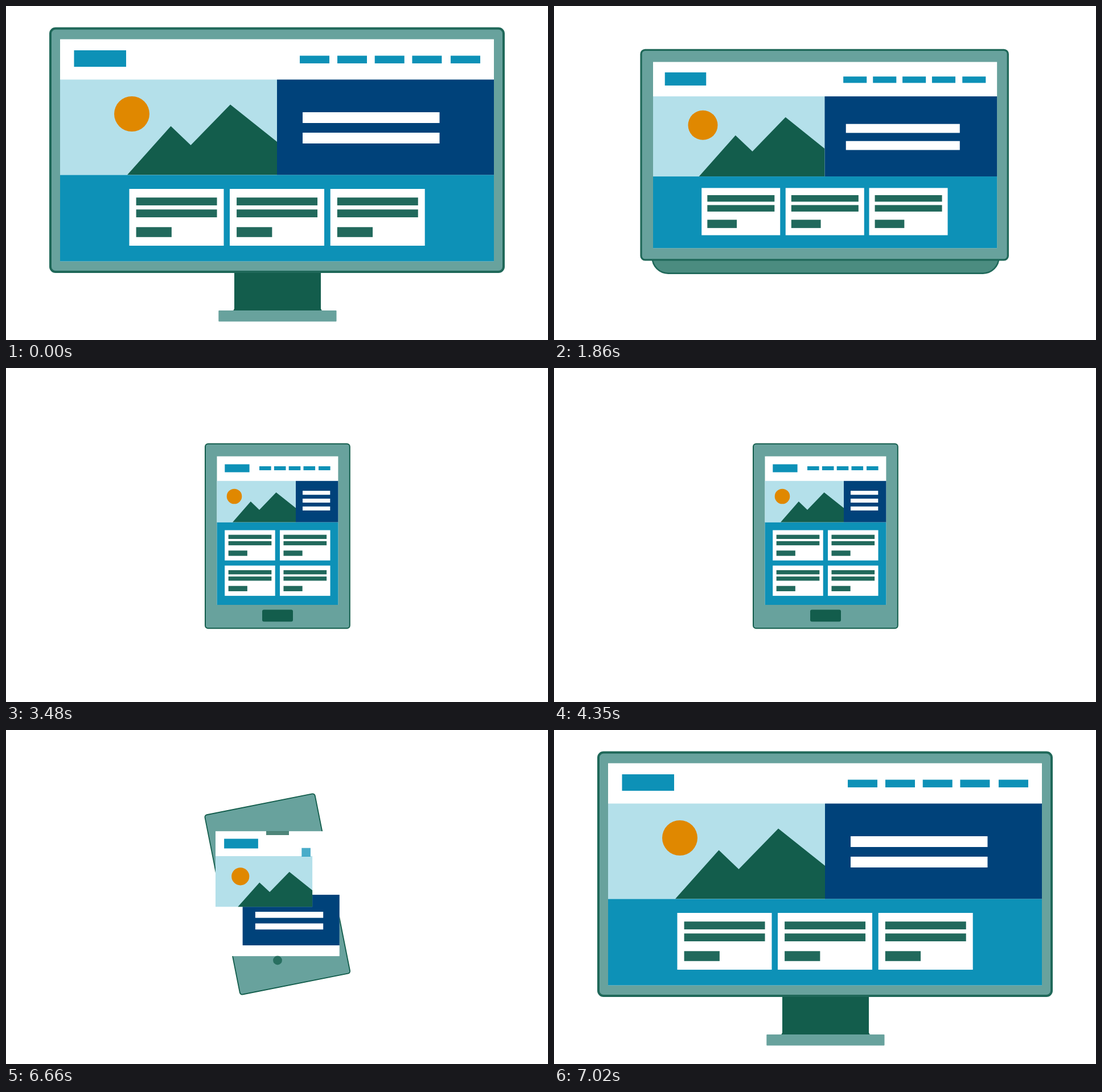
Animation, 952 px wide and 588 px high, one loop 7050 ms. Source, as an HTML page with a canvas:

```html
<!DOCTYPE html>
<html lang="en">
<head>
<meta charset="utf-8">
<title>Responsive layout</title>
<style>
  html, body { margin: 0; width: 100%; height: 100%; overflow: hidden; background: #fff; }
  canvas { display: block; }
</style>
</head>
<body>
<canvas id="stage" width="952" height="588"></canvas>
<script>
const ctx = document.getElementById('stage').getContext('2d');
const LOOP = 7050, STEP = 30;

const C = {
  page: '#fff', cyan: '#0d91b7', sky: '#b4e0ea', navy: '#00427a', sun: '#e08800',
  dark: '#135d4c', bar: '#21695c', body: '#68a29d', base: '#4b8c80', edge: '#1f6859'
};

// body: centre x, y, width, height, radius, stroke; boxes: left, top, right, bottom;
// peaks: foot x, then x, y of the ridge; lines: x, y, width, height, pitch;
// nav: x, y, span, width, height; cards: width, height, then x, y of each
const desktop = {
  body: [476, 253.8, 796, 428.5, 9, 4],
  screen: [95, 58.5, 857, 449.5],
  sky: [95, 129.5, 476, 297.3],
  navy: [476, 129.5, 857, 297.3],
  logo: [119.5, 78, 211, 107],
  sun: [221, 190, 31],
  peaks: [213, 289.5, 211.5, 324.5, 245, 394, 173.5, 476, 239],
  lines: [521, 187, 240.5, 19, 36],
  nav: [516, 87.5, 265, 52, 13.5],
  cards: [166, 100, 216.5, 322, 393, 322, 569.7, 322, 569.7, 322]
};
const laptop = {
  body: [474.3, 270.5, 492.5, 310.5, 5, 2.6],
  screen: [253, 138.5, 699.3, 403],
  sky: [253, 188.7, 474.5, 302.8],
  navy: [474.5, 188.7, 699.3, 302.8],
  logo: [270, 155.7, 323.5, 173],
  sun: [302, 229.5, 21],
  peaks: [296.5, 348, 244, 372.5, 267, 419.3, 218, 474.5, 263],
  lines: [504.5, 228.3, 159.5, 12.5, 24.2],
  nav: [500.3, 160.8, 153.2, 30.2, 9],
  cards: [110, 66.3, 302, 318.7, 420.5, 318.7, 537.3, 318.7, 537.3, 318.7]
};
const tablet = {
  body: [476.9, 295.8, 253.8, 324.8, 5, 2],
  screen: [370.5, 155.5, 583.4, 417],
  sky: [370.5, 198.8, 509, 271.5],
  navy: [509, 198.8, 583.4, 271.5],
  logo: [384.3, 169.5, 427.6, 183.5],
  sun: [401, 226, 13.3],
  peaks: [398, 429.8, 235, 445, 249.7, 474.5, 219, 509, 246.5],
  lines: [521, 216.2, 48.3, 7, 13.8],
  nav: [445, 173, 104, 20.6, 7],
  cards: [88.5, 53.3, 384.2, 285.5, 481, 285.5, 384.2, 347.8, 481, 347.8]
};
const phone = {
  body: [476.9, 294, 164, 254.8, 3.5, 1.5],
  screen: [407, 195.3, 547, 390.8],
  sky: [407, 235.3, 547, 313.2],
  navy: [407, 313, 547, 390.8],
  logo: [420.8, 207.7, 476, 223],
  sun: [439, 267.5, 13.4],
  peaks: [435, 467.5, 276.5, 483, 291, 512.5, 260.5, 547, 288.5],
  lines: [426, 339, 102, 9.5, 18.3],
  nav: tablet.nav,
  cards: tablet.cards
};

const MOVES = [
  { at: 1740, from: desktop, to: laptop, turn: 0 },
  { at: 3150, from: laptop, to: tablet, turn: 90 },
  { at: 4950, from: tablet, to: phone, turn: 0 },
  { at: 6630, from: phone, to: desktop, turn: -90 }
];
const MOVE_TIME = 240;

const ramp = (t, a, b) => Math.min(1, Math.max(0, (t - a) / (b - a)));
const during = (t, a, b, c, d) => ramp(t, a, b) - ramp(t, c, d);
const mix = (a, b, p) => a.map((v, i) => v + (b[i] - v) * p);

function pose(t) {
  const move = MOVES.filter(m => t >= m.at).pop() || MOVES[0];
  const p = ramp(t, move.at, move.at + MOVE_TIME);
  const s = {};
  for (const key in desktop) s[key] = mix(move.from[key], move.to[key], p);
  s.angle = 0;
  if (move.turn && p < 1) {
    const [x, y, w, h, ...rest] = move.to.body;
    s.body = mix(move.from.body, [x, y, h, w, ...rest], p);
    s.angle = move.turn * p * Math.PI / 180;
  }
  s.edge = move.from === tablet || move.from === phone && p < 1 ? C.dark : C.edge;
  if (move.to === tablet && p === 1) s.edge = C.dark;
  return s;
}

function fill(color, x, y, w, h) {
  ctx.fillStyle = color;
  ctx.fillRect(x, y, w, h);
}
function box(color, [l, t, r, b]) { fill(color, l, t, r - l, b - t); }
function rounded(color, x, y, w, h, r) {
  ctx.beginPath();
  ctx.roundRect(x, y, w, h, r);
  ctx.fillStyle = color;
  ctx.fill();
}
function disc(color, x, y, r) {
  ctx.beginPath();
  ctx.arc(x, y, r, 0, Math.PI * 2);
  ctx.fillStyle = color;
  ctx.fill();
}
function faded(alpha, paint) {
  if (alpha <= 0) return;
  ctx.save();
  ctx.globalAlpha = alpha;
  paint();
  ctx.restore();
}
function outline(color, width) {
  ctx.strokeStyle = color;
  ctx.lineWidth = width;
  ctx.stroke();
}

function drawStand(t) {
  const out = 1 - during(t, 1500, 1740, 6870, 7020);
  if (out <= 0) return;
  ctx.save();
  ctx.beginPath();
  ctx.rect(0, 460, 952, 128);
  ctx.clip();
  ctx.translate(0, -95 * (1 - out));
  ctx.fillStyle = C.dark;
  ctx.fill(new Path2D('M401 450V533l-2 3.5H555l-2-3.5V450z'));
  rounded(C.body, 373.3, 536, 207.2, 19.5, 1);
  ctx.restore();
}

function drawKeyboard(t) {
  faded(during(t, 1740, 1860, 3030, 3150), () => {
    rounded(C.base, 172.6, 426.6, 608.8, 44, [0, 0, 28, 28]);
    outline(C.edge, 2.6);
    rounded(C.dark, 409.3, 427.5, 135.2, 17, [0, 0, 8, 8]);
  });
}

function drawBody(s) {
  const [x, y, w, h, r, line] = s.body;
  ctx.save();
  ctx.translate(x, y);
  ctx.rotate(s.angle);
  rounded(C.body, -w / 2, -h / 2, w, h, r);
  outline(s.edge, line);
  ctx.restore();
}

function drawPicture(s) {
  const bottom = s.sky[3], p = s.peaks;
  box(C.sky, s.sky);
  disc(C.sun, ...s.sun);
  ctx.beginPath();
  ctx.moveTo(p[0], bottom);
  for (let i = 1; i < 9; i += 2) ctx.lineTo(p[i], p[i + 1]);
  ctx.lineTo(p[7], bottom);
  ctx.fillStyle = C.dark;
  ctx.fill();
}

function drawCard(x, y, w, h) {
  fill(C.page, x, y, w, h);
  const bar = (top, wide, high) => fill(C.bar, x + w * .073, y + h * top, w * wide, h * high);
  bar(.152, .855, .138);
  bar(.362, .855, .138);
  bar(.673, .375, .175);
}

function drawScreen(s, t) {
  const full = 1 - during(t, 4830, 4950, 6870, 7020);
  const extra = during(t, 3390, 3480, 4830, 4950);
  const [left, , right, bottom] = s.screen;
  box(C.page, s.screen);

  faded(full, () => {
    box(C.cyan, [left, s.sky[3], right, bottom]);
    const [x, y, span, w, h] = s.nav;
    for (const k of [0, .249, .497, .745, 1]) fill(C.cyan, x + span * k, y, w, h);
  });
  const [w, h, ...spots] = s.cards;
  for (let i = 0; i < 4; i++) {
    faded(i < 3 ? full : extra, () => drawCard(spots[2 * i], spots[2 * i + 1], w, h));
  }

  box(C.navy, s.navy);
  const [lx, ly, lw, lh, pitch] = s.lines;
  for (let i = 0; i < 3; i++) {
    faded(i < 2 ? 1 : extra, () => fill(C.page, lx, ly + i * pitch, lw, lh));
  }
  drawPicture(s);
  box(C.cyan, s.logo);
}

function drawControls(t) {
  faded(during(t, 3390, 3480, 4830, 4950), () => rounded(C.dark, 450, 425.5, 54, 21, 3));
  faded(during(t, 5190, 5280, 6630, 6750), () => {
    fill(C.dark, 457, 178, 40, 7);
    fill(C.cyan, 519.3, 207.7, 15.6, 15.3);
    disc(C.dark, 477, 405.5, 7.9);
  });
}

function draw(ms) {
  const t = Math.floor((ms % LOOP) / STEP) * STEP;
  const s = pose(t);
  fill(C.page, 0, 0, 952, 588);
  drawStand(t);
  drawKeyboard(t);
  drawBody(s);
  drawScreen(s, t);
  drawControls(t);
}

const start = performance.now();
function tick() {
  draw(performance.now() - start);
  requestAnimationFrame(tick);
}
tick();
</script>
</body>
</html>
```
